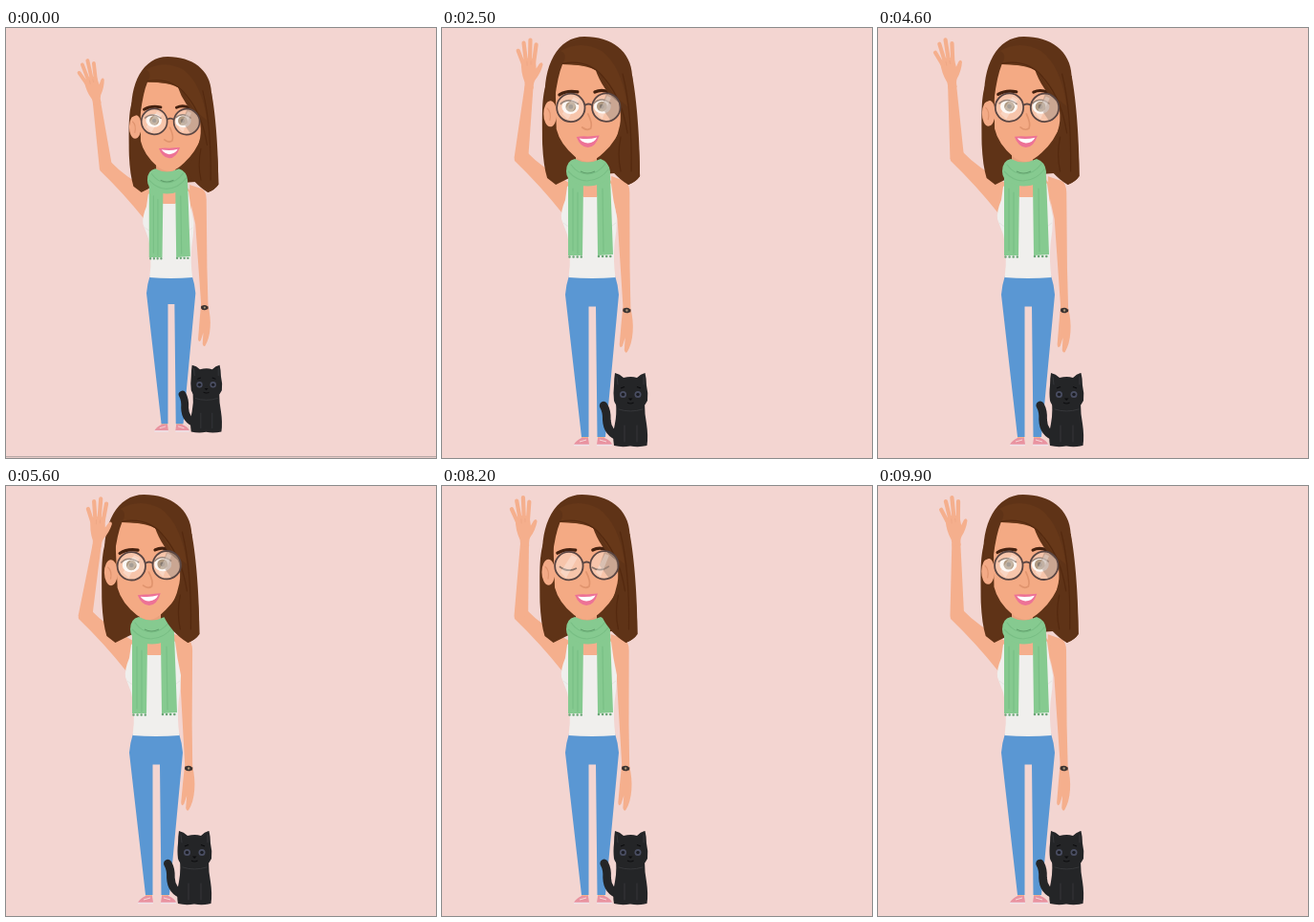
An HTML page that plays this animation: 450x450 px, repeating every 10000 ms.

```html
<!DOCTYPE html>
<html lang="en">
<head>
<meta charset="utf-8">
<title>Waving woman with cat</title>
<style>
  html, body { margin: 0; width: 100%; height: 100%; overflow: hidden; background: #f3d5d1; }
  svg { display: block; width: 100vw; height: 100vh; }
  .skin { fill: #f5af8d; }
  .finger { fill: none; stroke: #f5af8d; stroke-width: 4.2; stroke-linecap: round; }
  .hair { fill: #5f3317; }
  .strand { fill: none; stroke: #54290f; stroke-width: 1.2; stroke-linecap: round; }
  .brow { fill: none; stroke: #44210f; stroke-width: 3.2; stroke-linecap: round; }
  .scarf { fill: #86ca90; }
  .fold { fill: none; stroke: #79bf85; stroke-width: 1.2; stroke-linecap: round; }
  .tassel { fill: none; stroke: #6ca577; stroke-width: 2.6; stroke-linecap: round; stroke-dasharray: 0 4.1; }
  .rim { fill: none; stroke: #5a4643; stroke-width: 1.8; }
  .lens { fill: #fff; opacity: .32; }
  .cat { fill: #242527; }
  .line { fill: none; stroke: #36373a; stroke-width: 1; stroke-linecap: round; }
</style>
</head>
<body>
<svg viewBox="0 0 450 450">
  <rect width="450" height="450" fill="#f3d5d1"/>
  <g id="camera">
    <path d="M-60 465.5H500" stroke="#b9a9a7" stroke-width="1.4"/>

    <!-- lowered arm -->
    <g id="lowArm">
      <path class="skin" d="M176 155L190 160Q195 163 195 172L194.500 250L195 293Q198 307 197 318Q196 331 191 339Q189 341 188 337L189 324L186 333Q183 336 183 331L185 310L187 291L182 200L176 170Z"/>
      <path d="M187 295L195 296" stroke="#3a3230" stroke-width="3"/>
      <ellipse cx="190.8" cy="295.500" rx="3.6" ry="2.8" fill="#3a3230"/>
      <circle cx="191" cy="295.500" r="1.2" fill="#a89274"/>
    </g>

    <path class="skin" d="M76 139Q75 134 79 131L89 130Q104 146 133 162L134 196L126 194Q103 165 76 139Z"/>

    <!-- legs and shoes -->
    <path class="skin" d="M146 426H153V432H146ZM163 426H170V432H163Z"/>
    <path fill="#e993a0" d="M146 429H153L154 436H138Q140 432 146 429ZM163 429H170Q177 432 178 436H162Z"/>
    <path d="M138 436.500H154M162 436.500H178" stroke="#efe3ea" stroke-width="1.600"/>
    <path d="M144 433L151 431M165 431L172 433" stroke="#f6d8da" stroke-width="1"/>
    <path fill="#5a97d3" d="M133 259H181Q184 268 185 279L171 428H162.500L161 291.500H153.500V428H146L129 279Q130 268 133 259Z"/>

    <!-- torso -->
    <path class="skin" d="M133 160L172 154L181 165L180 195H128Z"/>
    <path fill="#f0efed" d="M131 166L137 162L148 177H162L172 160L177 163Q179 180 183 198Q183 212 180.500 226Q179 244 181.500 261Q157 263 132.500 261Q136 236 131 216L125 200Q124 192 129 180Z"/>
    <path d="M127 204Q134 211 146 208M163 208Q175 211 182 204" fill="none" stroke="#e6e4e2" stroke-width="1"/>

    <path id="backHair" class="hair" d="M108 50C98 66 100 90 100 122Q101 144 105 157L114 164L132 155L176 152L190 164Q198 161 202 155C202 120 197 90 194 50Z"/>
    <path fill="#e8a17d" d="M140 128H162V154H140Z"/>

    <!-- scarf -->
    <path class="scarf" d="M132 154L148 160L147 238H132ZM162 160L176 154L179 237L163 238Z"/>
    <path class="fold" d="M137 168V233M142 172V236M168 168L169 234"/>
    <path class="tassel" d="M133.500 239.500H147M164 239H178.500"/>
    <path class="scarf" d="M130 150Q130 139 139 137Q152 144 166 137Q175 140 176 150Q177 158 168 162Q152 169 138 162Q130 158 130 150Z"/>
    <path class="fold" d="M132 150Q141 160 152 160Q166 159 174 148M135 143Q142 153 152 153Q163 153 171 142"/>
    <path d="M145 150Q152 154 160 150" fill="none" stroke="#62a06d" stroke-width="1.200"/>

    <g id="face">
      <ellipse cx="109.500" cy="90" rx="7" ry="13.500" fill="#f3aa86"/>
      <path d="M106 84Q111 88 109 97" fill="none" stroke="#e0946f" stroke-width="1.200"/>
      <path fill="#f4aa84" d="M114 34H186V98Q179 118 166 130Q157 139 150 140Q143 140 136 135Q120 122 116 106Z"/>
      <path class="brow" d="M119 70Q127 65 138 67M156 67Q163 63.500 171 67"/>

      <g id="openEyes">
        <ellipse cx="130.500" cy="82.500" rx="9" ry="7.500" fill="#fbf4ee"/>
        <ellipse cx="164" cy="82" rx="9" ry="7.500" fill="#fbf4ee"/>
        <g fill="#8b6a48"><circle cx="131" cy="82.500" r="5.400"/><circle cx="163.500" cy="82" r="5.400"/></g>
        <g fill="#4a382a"><circle cx="131" cy="82.500" r="2.400"/><circle cx="163.500" cy="82" r="2.400"/></g>
        <path d="M120 80Q128 72 139 80M155 79Q163 71 173 79" fill="none" stroke="#6b4a38" stroke-width="1.500"/>
      </g>
      <g id="shutEyes">
        <path d="M121 84Q130 91 139 86M155 85Q164 91 173 84" fill="none" stroke="#573626" stroke-width="1.800"/>
      </g>

      <path d="M149 90Q154 100 152 105Q148 108 143 104" fill="none" stroke="#e0946e" stroke-width="1.700" stroke-linecap="round"/>
      <path fill="#ed7296" d="M137 114Q143 113 149 113.500Q155 113 161 112.500Q157 125 149 125Q141 124.500 137 114Z"/>
      <path fill="#fff" d="M140 115.500Q150 117 158.500 114.500Q156 120 149 120.500Q143 120 140 115.500Z"/>
    </g>

    <!-- hair above the forehead and down the right side -->
    <g id="frontHair">
      <path class="hair" d="M103 78C100 40 116 9 144 9C172 9 193 24 194 50C199 76 202 118 202 155Q198 161 190 164C178 157 170 147 165 137Q177 122 181 102Q183 92 180 78Q163 66 155 42Q140 38 121 38Q116 50 113 74Z"/>
      <path d="M121 38Q127 27 119 24Q140 12 162 24Q183 40 189 82Q170 68 162 49Q152 38 121 38Z" fill="#673819"/>
      <path class="strand" d="M121 37Q150 32 166 54Q184 76 189 110M184 48Q194 88 193 150M182 114Q178 132 182 150"/>
    </g>

    <g id="glasses">
      <circle class="lens" cx="131" cy="83.500" r="14.500"/>
      <circle class="lens" cx="168" cy="83" r="14.500"/>
      <path d="M168 69Q181 71 182 83Q181 94 173 97L163 83Z" fill="#a58d7e" opacity=".55"/>
      <path d="M122 90L134 72L140 75L128 96ZM159 90L169 71L173 73L164 95Z" fill="#fff" opacity=".28"/>
      <circle class="rim" cx="131" cy="83.500" r="14.700"/>
      <circle class="rim" cx="168" cy="83" r="14.700"/>
      <path class="rim" d="M145.500 81Q149.500 78 153.500 81"/>
    </g>

    <!-- raised forearm, in front of the hair -->
    <g id="foreArm">
      <path class="skin" d="M79 60L75.500 136Q77 142 84 140L90 131L88 60Z"/>
      <g transform="rotate(-7 83 60)">
        <path class="skin" d="M79 63L88 63Q88 57 90 54Q96 47 98.500 38Q98 34.500 95 37L91.500 42L91 33Q83 28 76 34Q75 45 79 56Z"/>
        <path class="finger" d="M78 37L73 23M81 35L79 15M85 34L86 12M89 36L92 17"/>
        <path d="M82 34L82 39M86 34L86 38" stroke="#eca584" stroke-width=".7" fill="none"/>
      </g>
    </g>

    <!-- cat -->
    <path id="tail" d="M186 428Q173 424 172.500 410Q173 401 169.500 395" fill="none" stroke="#242527" stroke-width="8.600" stroke-linecap="round"/>
    <path class="cat" d="M182 392H212Q212 404 214 414Q216 427 214.500 437Q206 439 197 437.500Q188 439 180 437Q178 426 181 414Q183 404 182 392Z"/>
    <path class="cat" d="M181 361Q186 362 190 366Q198 364 204 366Q208 362 212.500 361Q214 367 214 374Q216 382 215 390Q211 400 197 400Q183 400 180 390Q179 382 180 374Q180 367 181 361Z"/>
    <path class="line" d="M183 365L184 373M211 365L211 373M191 416V433M204 416V433M185 399Q197 403 210 399"/>
    <g fill="#4a4e62"><circle cx="189.500" cy="383.500" r="3.500"/><circle cx="205" cy="383.500" r="3.500"/></g>
    <g fill="#1b1c22"><circle cx="189.500" cy="383.500" r="1.800"/><circle cx="205" cy="383.500" r="1.800"/></g>
    <path d="M195 387.500H199.500L197.200 390Z" fill="#0d0d0f"/>
    <path d="M194 392Q197.200 394 200.500 392M187 377L191 375.500M204 375.500L208 377" fill="none" stroke="#0d0d0f" stroke-width="1.100"/>
  </g>
</svg>
<script>
  const LOOP = 10000, STEP = 100, WAVE = LOOP / 15, ZOOM = 2100;
  const part = id => document.getElementById(id);
  const move = (value, ...ids) => ids.forEach(id => part(id).setAttribute("transform", value));
  const swing = (t, lag) => Math.cos(2 * Math.PI * (t / WAVE - lag));

  function draw(t) {
    const zoom = 0.917 + 0.083 * Math.min(1, t / ZOOM);
    move(`translate(346 261) scale(${zoom}) translate(-346 -261)`, "camera");

    // the face sways a little less than the hair and tilts with it
    const lean = 4.5 + 4.7 * swing(t, -0.02);
    move(`translate(${lean})`, "backHair", "frontHair");
    move(`translate(${lean * 0.75}) rotate(${lean * 0.25 - 1} 150 84)`, "face", "glasses");

    move(`translate(${lean * 0.25}) rotate(${-lean * 0.1} 188 165)`, "lowArm");
    move(`rotate(${2.2 - 11.2 * swing(t, 0.05)} 81 137)`, "foreArm");
    move(`rotate(${swing(t, 0.1) * 1.2} 184 426)`, "tail");

    // a short blink three times per loop
    const shut = (t + 1900) % (LOOP / 3) < 200;
    part("openEyes").style.display = shut ? "none" : "";
    part("shutEyes").style.display = shut ? "" : "none";
  }

  const start = performance.now();
  function tick() {
    const t = (performance.now() - start) % LOOP;
    draw(Math.floor(t / STEP) * STEP);
    requestAnimationFrame(tick);
  }
  tick();
</script>
</body>
</html>
```
